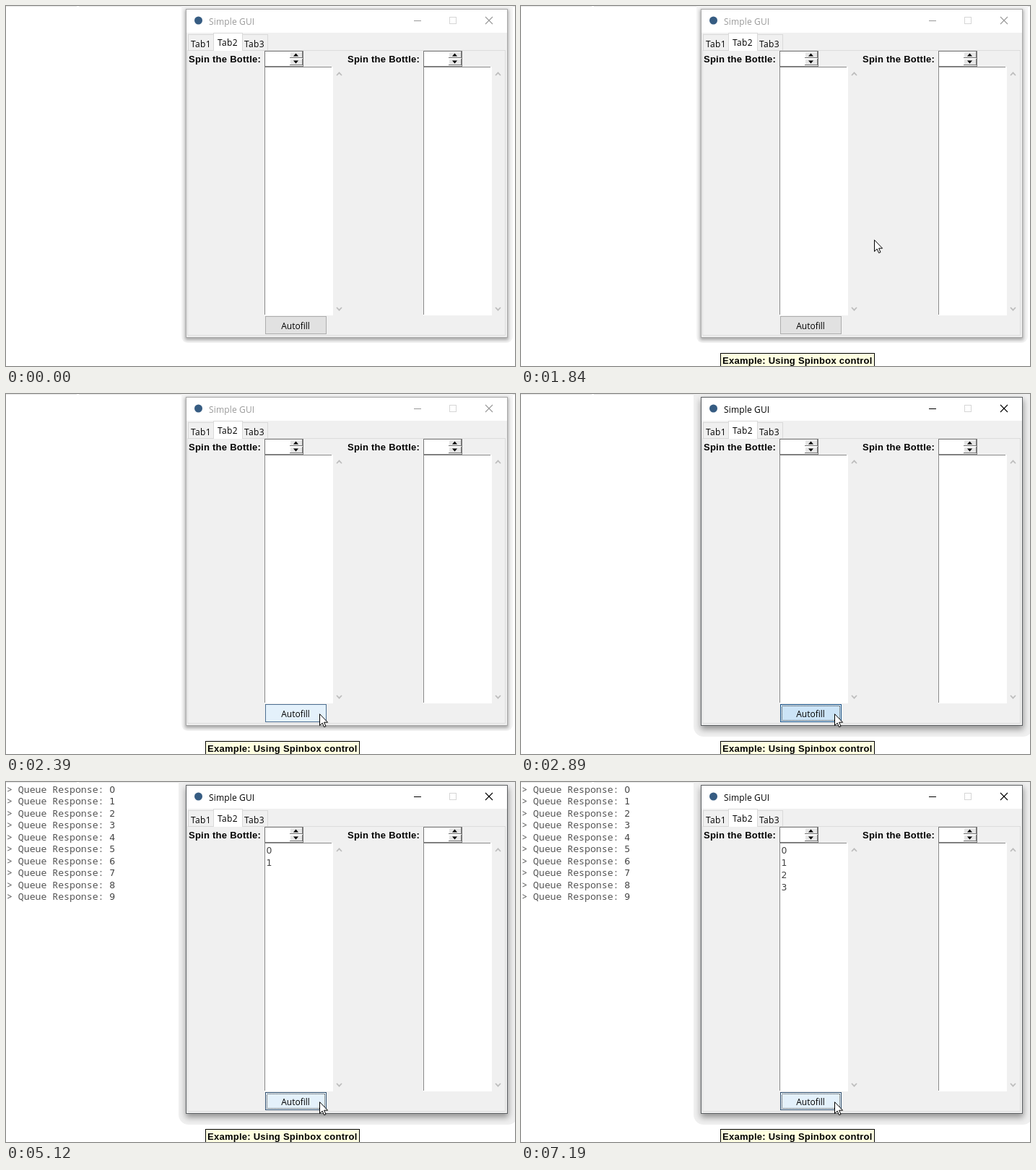
These frames come from a looping animation (705x498 px, 8 s). An HTML page:

```html
<!DOCTYPE html>
<html lang="en">
<head>
<meta charset="utf-8">
<title>Spinbox demo</title>
<style>
  html, body { margin: 0; width: 100%; height: 100%; overflow: hidden; background: #fff; }
  svg { display: block; }
  .px { shape-rendering: crispEdges; }
  .ui { font: 12px "Open Sans", "Noto Sans", sans-serif; }
  .tab { letter-spacing: .35px; }
  .title { letter-spacing: .15px; }
  .bold { font: bold 13px "Liberation Sans", Arial, sans-serif; letter-spacing: .25px; }
  .mono { font: 13.2px "Noto Sans Mono", monospace; fill: #555; white-space: pre; }
  .digit { font: 12.4px "DejaVu Sans", sans-serif; fill: #444; }
  .frame { fill: none; stroke: #a9a9a9; }
  .title { fill: #999; }
  .glyph { fill: none; stroke: #999; }
  .active .frame { stroke: #5c5f62; }
  .active .title { fill: #000; }
  .active .glyph { stroke: #000; }
  .idle-shade, .active .active-shade { visibility: visible; }
  .active-shade, .active .idle-shade { visibility: hidden; }
  .btn { fill: #e1e1e1; stroke: #adadad; }
  .btn.hover { fill: #e4f1fb; stroke: #4d6f91; }
  .btn.down { fill: #cce4f7; stroke: #1f5485; }
  .btn.focus { fill: #e4f1fb; stroke: #33506e; }
</style>
</head>
<body>
<svg id="stage" width="705" height="498" viewBox="0 0 705 498">
  <defs>
    <filter id="soft" x="-10%" y="-10%" width="120%" height="120%"><feGaussianBlur stdDeviation="2.2"/></filter>
    <filter id="wide" x="-10%" y="-10%" width="120%" height="120%"><feGaussianBlur stdDeviation="4.5"/></filter>
    <g id="chevron"><path d="M-3.5 2L0 -1.7L3.5 2" fill="none" stroke="#bdbdbd" stroke-width="1.7"/></g>
    <g id="spinButton" class="px">
      <rect width="18" height="9" fill="#e6e6e6"/>
      <path d="M0 .5H17M.5 0V8" stroke="#fff"/>
      <path d="M0 8.5H18M17.5 0V9" stroke="#777"/>
    </g>
    <g id="column">
      <text class="bold" x="253" y="78">Spin the Bottle:</text>
      <g class="px">
        <rect x="358.5" y="62.5" width="53" height="21" fill="#fff" stroke="#777"/>
        <use href="#spinButton" x="393" y="63"/>
        <use href="#spinButton" x="393" y="73"/>
        <rect x="358" y="84" width="95" height="344" fill="#fff"/>
        <path d="M358 84.5H451M358.5 84V427" stroke="#8a8a8a"/>
      </g>
      <path d="M398 69.5h7l-3.5 -4zM398 75.5h7l-3.5 4z"/>
      <use href="#chevron" x="461.5" y="94"/>
      <use href="#chevron" transform="translate(461.5 419) scale(1 -1)"/>
    </g>
  </defs>

  <path class="px" d="M0 .5H98M101 .5H386M389 .5H607M610 .5H705" stroke="#e6e6e6"/>
  <g id="console"></g>

  <g id="win">
    <rect class="idle-shade" x="243" y="-10" width="459" height="476" rx="9" fill="#f4f4f4"/>
    <rect class="idle-shade" x="248" y="5" width="448" height="457" fill="#000" opacity=".32" filter="url(#soft)"/>
    <rect class="active-shade" x="239" y="-20" width="470" height="494" rx="14" fill="#efefef"/>
    <rect class="active-shade" x="249" y="8" width="447" height="456" fill="#000" opacity=".38" filter="url(#wide)"/>

    <g class="px">
      <rect x="249" y="4" width="446" height="455" fill="#f0f0f0"/>
      <rect x="250" y="5" width="444" height="32" fill="#fff"/>
      <rect class="frame" x="249.5" y="4.5" width="445" height="454"/>
      <rect x="251.5" y="61.5" width="440" height="394" fill="#f0f0f0" stroke="#dcdcdc"/>
      <rect x="252.5" y="39.5" width="36" height="22" fill="#f0f0f0" stroke="#d9d9d9"/>
      <rect x="327.5" y="39.5" width="35" height="22" fill="#f0f0f0" stroke="#d9d9d9"/>
      <path d="M287.5 62V37.5H327.5V62" fill="#fff" stroke="#d9d9d9"/>
      <path class="glyph" d="M565 20.5H575"/>
      <rect x="614.5" y="15.5" width="9" height="9" fill="none" stroke="#d6d6d6"/>
    </g>
    <path class="glyph" d="M664 15L674 25M674 15L664 25" stroke-width="1.1"/>
    <circle cx="266.5" cy="20" r="5.5" fill="#365c82"/>
    <text class="ui title" x="281" y="26">Simple GUI</text>
    <text class="ui tab" x="256" y="57">Tab1</text>
    <text class="ui tab" x="293" y="55">Tab2</text>
    <text class="ui tab" x="330" y="57">Tab3</text>

    <use href="#column"/>
    <use href="#column" x="220"/>
    <g id="list"></g>

    <rect id="btn" class="btn px" x="359.5" y="429.5" width="84" height="24"/>
    <rect id="focus" class="px" x="361.5" y="431.5" width="80" height="20" fill="none" stroke="#333" stroke-dasharray="1 1"/>
    <text class="ui" x="401" y="447" text-anchor="middle">Autofill</text>
  </g>

  <g id="tip">
    <rect class="px" x="276.5" y="480.5" width="213" height="24" fill="#ffffe1" stroke="#000"/>
    <text class="bold" x="279" y="495">Example: Using Spinbox control</text>
  </g>
  <path id="cursor" d="M.5 .7V16.6L4.2 13.1L6.6 18.6L9 17.6L6.6 12.2H11.6Z" fill="#fff" stroke="#000" stroke-width="1"/>
</svg>
<script>
const LOOP = 8000;
const SHOW = 920, LEAVE = 1660, PRESS = 2890, RELEASE = 3140;
const FILL = [4130, 5120, 6180, 7190];

const $ = id => document.getElementById(id);
const [win, btn, focusRing, tip, cursor, log, list] =
  ['win', 'btn', 'focus', 'tip', 'cursor', 'console', 'list'].map($);

function addText(parent, cls, x, y, value) {
  const el = document.createElementNS('http://www.w3.org/2000/svg', 'text');
  el.setAttribute('class', cls);
  el.setAttribute('x', x);
  el.setAttribute('y', y);
  el.textContent = value;
  return parent.appendChild(el);
}

for (let i = 0; i < 10; i++) {
  const y = 14.5 + 16.55 * i;
  addText(log, 'mono', 1, y, '> Queue Response:');
  addText(log, 'digit', 143.2, y, i);
}
const items = FILL.map((_, i) => addText(list, 'digit', 360.5, 99 + 17 * i, i));

const show = (el, on) => { el.style.visibility = on ? 'visible' : 'hidden'; };

// The pointer moves in discrete steps of about 60 ms.
function pointer(t) {
  if (t < LEAVE) {
    const left = Math.max(0, 3 - Math.floor((t - SHOW) / 60)) ** 2;
    return [489 - left / 2, 321 + 3.25 * left];
  }
  const u = Math.min(13, Math.floor((t - LEAVE) / 60.8) + 1) / 13;
  const e = u < .5 ? 4 * u ** 3 : 1 - 4 * (1 - u) ** 3;
  const bend = (a, b, c) => (1 - e) ** 2 * a + 2 * e * (1 - e) * b + e * e * c;
  return [bend(489, 492.6, 434), bend(321, 342, 442)];
}

function draw(t) {
  const on = t >= SHOW;
  show(tip, on);
  show(cursor, on);
  const [x, y] = pointer(Math.max(t, SHOW)).map(Math.round);
  cursor.setAttribute('transform', `translate(${x} ${y})`);

  const over = on && x >= 359 && x < 444 && y >= 429;
  const state = t >= RELEASE ? 'focus' : t >= PRESS ? 'down' : over ? 'hover' : '';
  btn.setAttribute('class', 'btn px ' + state);
  show(focusRing, t >= PRESS);
  win.classList.toggle('active', t >= PRESS);
  show(log, t >= RELEASE);
  items.forEach((el, i) => show(el, t >= FILL[i]));
}

const start = performance.now();
function tick() {
  draw((performance.now() - start) % LOOP);
  requestAnimationFrame(tick);
}
tick();
</script>
</body>
</html>
```
